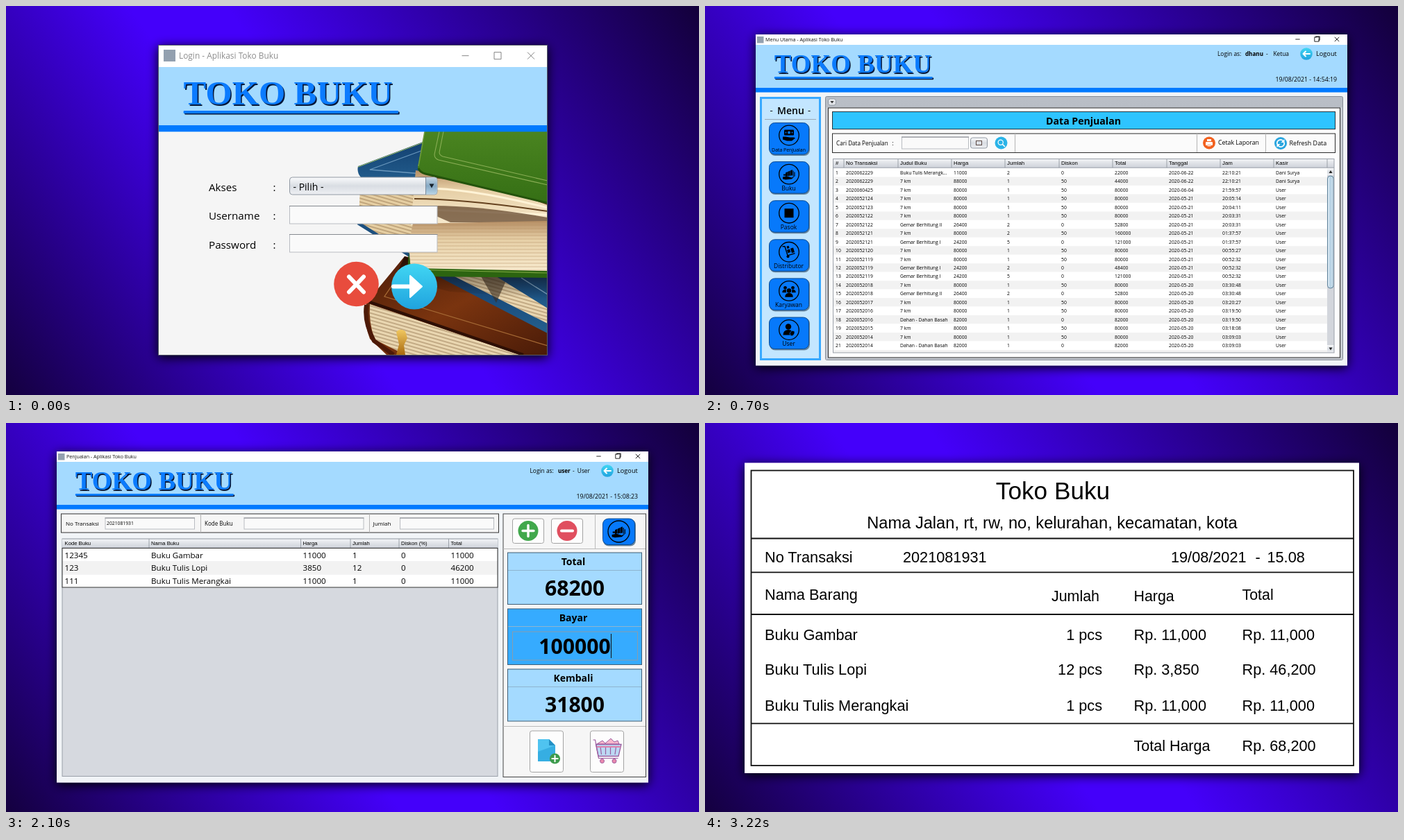
Recreate the animation shown at these times as an HTML page. Size 998 by 561 pixels, loop 3500 ms.

```html
<!DOCTYPE html>
<html lang="id">
<head>
<meta charset="utf-8">
<title>Toko Buku</title>
<style>
html, body { margin: 0; width: 100%; height: 100%; overflow: hidden; background: #14003f; }
svg { display: block; width: 998px; height: 561px; }
text { white-space: pre; }
.ui { font-family: "Open Sans", "Noto Sans", sans-serif; }
.sans { font-family: "Liberation Sans", Arial, sans-serif; }
.serif { font-family: "Liberation Serif", Times, serif; }
</style>
</head>
<body>
<svg id="stage" viewBox="0 0 998 561" xmlns="http://www.w3.org/2000/svg"></svg>
<script>
const HOLD = 700;
const SKY = '#a4daff', BLUE = '#007aff', CYAN = '#2ec4ff', GREY = '#d6d9df';

// --- drawing helpers ---
const rect = (x, y, w, h, fill, more = '') =>
  `<rect x="${x}" y="${y}" width="${w}" height="${h}" fill="${fill}" ${more}/>`;
const box = (x, y, w, h, fill, stroke, more = '') =>
  rect(x + .5, y + .5, w - 1, h - 1, fill, `stroke="${stroke}" ${more}`);
const disc = (x, y, r, fill, more = '') =>
  `<circle cx="${x}" cy="${y}" r="${r}" fill="${fill}" ${more}/>`;
const line = (d, stroke, w = 1, more = '') =>
  `<path d="${d}" fill="none" stroke="${stroke}" stroke-width="${w}" ${more}/>`;
const area = (d, fill, more = '') => `<path d="${d}" fill="${fill}" ${more}/>`;
const text = (x, y, s, size, { font = 'ui', fill = '#000', anchor = 'start', weight = 400 } = {}) =>
  `<text class="${font}" x="${x}" y="${y}" font-size="${size}" fill="${fill}" text-anchor="${anchor}" font-weight="${weight}">${s}</text>`;
const group = (x, y, k, body) => `<g transform="translate(${x} ${y}) scale(${k})">${body}</g>`;
const ROUND = 'stroke-linecap="round" stroke-linejoin="round"';
const MID = { anchor: 'middle' }, BOLD = { weight: 700 }, HEAD = { anchor: 'middle', weight: 700 };

const grad = (id, stops, dir = 'x1="0" y1="0" x2="0" y2="1"') =>
  `<linearGradient id="${id}" ${dir}>` +
  stops.map(([o, c]) => `<stop offset="${o}" stop-color="${c}"/>`).join('') + '</linearGradient>';

const defs = '<defs>' +
  grad('sky', [[0, '#14003f'], [.41, '#4400fa'], [.51, '#4400fa'], [1, '#13003a']],
    'gradientUnits="userSpaceOnUse" x1="33" y1="607" x2="965" y2="-46"') +
  grad('head', [[0, '#f4f5f8'], [.5, '#dfe2e7'], [1, '#cdd1d9']]) +
  grad('frame', [[0, '#b9bec6'], [1, '#a2a8b1']]) +
  grad('key', [[0, '#fafbfc'], [.5, '#d9dde3'], [1, '#eef0f3']]) +
  grad('arrow', [[0, '#c2d4e2'], [.5, '#86a9c4'], [1, '#b8d4e6']]) +
  grad('thumb', [[0, '#e9f3fa'], [.5, '#b3cfe2'], [1, '#d7e8f3']], 'x1="0" y1="0" x2="1" y2="0"') +
  grad('aqua', [[0, '#41d6f3'], [1, '#20a3de']]) +
  grad('green', [[0, '#4a8420'], [1, '#356f15']]) +
  grad('navy', [[0, '#123f70'], [1, '#24608f']]) +
  grad('brown', [[0, '#4c1c08'], [.5, '#7a340f'], [1, '#4a1b08']], 'x1="0" y1="0" x2="1" y2="1"') +
  grad('cream', [[0, '#b68e64'], [.35, '#e6cfa6'], [1, '#f8ebcf']]) +
  grad('gold', [[0, '#f1c860'], [1, '#a8690f']]) +
  grad('shade', [[0, 'rgba(20,8,0,.75)'], [1, 'rgba(20,8,0,0)']]) +
  '<pattern id="leaf" width="8" height="5" patternUnits="userSpaceOnUse"><path d="M0 1H8" stroke="#b08a5c" stroke-opacity=".45"/></pattern>' +
  '<pattern id="tilt" width="8" height="5" patternUnits="userSpaceOnUse" patternTransform="rotate(16)"><path d="M0 1H8" stroke="#84613c" stroke-width="1.3" stroke-opacity=".6"/></pattern>' +
  '<filter id="drop" x="-20%" y="-20%" width="140%" height="140%"><feDropShadow dx="0" dy="3" stdDeviation="8" flood-color="#000" flood-opacity="1"/></filter>' +
  '<clipPath id="view"><rect x="219" y="181" width="561" height="322"/></clipPath>' +
  '<clipPath id="rows"><rect x="184" y="220" width="722" height="280"/></clipPath></defs>';

// --- shared parts ---
function controls(xs, y, s, color, restore) {
  const [a, b, c] = xs;
  const back = restore ? line(`M${b - s + 2} ${y - s + 1}v-2H${b + s + 1}V${y + s - 2}h-2`, color, .9) : '';
  return line(`M${a - s} ${y}h${2 * s}`, color, .9) + back +
    line(`M${b - s} ${y - s}h${2 * s}v${2 * s}h${-2 * s}z`, color, .9) +
    line(`M${c - s} ${y - s}l${2 * s} ${2 * s}m0 ${-2 * s}l${-2 * s} ${2 * s}`, color, .9);
}

function logo(x, y, size, w, bar, barH) {
  const off = .5 + size / 45;
  const word = (d, fill) => text(x + d, y + d, 'TOKO BUKU', size, { font: 'serif', fill, weight: 700 }) +
    rect(x + d, bar + d, w, barH, fill, 'rx="1"');
  return word(off, '#06183a') + word(0, '#0b7bff');
}

const field = (x, y, w, h) => box(x, y, w, h, '#fafafa', '#b9bcc1') + line(`M${x} ${y + .5}h${w}`, '#85898f');
const nimKey = (x, y, w, h, r = 3) => box(x, y, w, h, 'url(#key)', '#9199a3', `rx="${r}"`);
const plainKey = (x, y, w, h) => box(x, y, w, h, '#fdfdfd', '#a3a3a3', 'rx="3"');

const leftArrow = (x, y) => disc(x, y, 8.8, 'url(#aqua)') +
  line(`M${x + 5} ${y}H${x - 4.5}m3.5 -3.5l-3.5 3.5l3.5 3.5`, '#fff', 2, ROUND);
const search = (x, y) => disc(x, y, 9, '#2ab4e8') + disc(x - .8, y - .8, 3.6, 'none', 'stroke="#fff" stroke-width="1.2"') +
  line(`M${x + 2} ${y + 2}l3 3`, '#fff', 1.6, ROUND);
const refresh = (x, y) => disc(x, y, 9, '#2ba6df') +
  line(`M${x - 5} ${y + 1}a5 5 0 0 1 8.5 -4.5M${x + 5} ${y - 1}a5 5 0 0 1 -8.5 4.5`, '#fff', 1.8) +
  area(`M${x + 5.5} ${y - 6}v5h-5zM${x - 5.5} ${y + 6}v-5h5z`, '#fff');

function grid({ x, y, w, heads, rows, pitch, size, top = y + 13.5, headSize = 7.8 }) {
  const cols = heads.map(h => h[0]);
  let out = rect(x, y, w, 13.5, 'url(#head)') + line(`M${x} ${y + 13.2}h${w}`, '#8f959e', .8) +
    line(`M${x} ${y + .4}h${w}`, '#aab0b8', .8);
  heads.forEach(([cx, label], i) => {
    if (i) out += line(`M${cx - 3} ${y}v13`, '#8c929b', .8);
    out += text(cx, y + 9.4, label, headSize, { font: 'sans' });
  });
  rows.forEach((row, r) => {
    const ry = top + r * pitch;
    out += rect(x, ry, w, pitch, r % 2 ? '#f2f2f2' : '#fff');
    row.forEach((cell, i) => out += text(cols[i], ry + pitch / 2 + size * .37, cell, size));
  });
  return out;
}

// --- small pictograms, drawn around 0,0 ---
const books = rect(-8, 0, 6, 2, '#000') + area('M-9 4l6-1 7 2 5-3-5 5-9 1-4-1z', '#000') +
  [-5, -1.6, 1.8].map((x, i) => area(`M${x} ${-2 + i * -1.5}l3-1.5v${6 + i}l-3 1z`, '#000')).join('') +
  line('M6 -5v8M8 -3v6', '#000', 1.1);
const person = (x, y, k) => group(x, y, k, disc(0, -3, 2.8, '#000') + area('M-5 5q0-5 5-5t5 5z', '#000'));
const icons = [
  rect(-7, -8, 14, 8, '#000', 'rx="1"') + disc(0, -4, 2, BLUE) + disc(-4.5, -4, .9, BLUE) + disc(4.5, -4, .9, BLUE) +
    area('M-9 2h4l6 1h6l2 1-5 4h-7l-6-2z', '#000'),
  books,
  rect(-6.5, -6.5, 13, 13, '#000'),
  line('M-9 -8h3l4 13l10 -3', '#000', 1.4, ROUND) + disc(-1.5, 6.5, 2, '#000') +
    area('M-3 -3l4-1.2 1.3 4.4-4 1.2zM2 -5l4-1.2 2 6.5-4 1.2zM-3.5 -8l3-1 1 3.2-3 1z', '#000'),
  person(-5.5, -2, .85) + person(5.5, -2, .85) + disc(0, 0, 4.3, BLUE) + person(0, 3, 1.15),
  person(-1, 0, 1.5) + area('M4 1l4 1v3q-1 3-4 4q-3-1-3-4z', '#000', 'stroke="#007aff" stroke-width=".8"'),
];
const menu = ['Data Penjualan', 'Buku', 'Pasok', 'Distributor', 'Karyawan', 'User'];
const blueKey = (x, y, w, h) => rect(x + 1, y + 1.5, w, h, '#66859f', 'rx="8"') +
  box(x, y, w, h, '#0779fb', '#0b4c92', 'rx="8"');
const ring = (x, y, r, icon, k = 1) => disc(x, y, r, 'none', 'stroke="#000" stroke-width="1.3"') + group(x, y, k, icon);

function mainWindow(title, user, role, time, tone = '#111') {
  const start = role === 'User' ? [754.5, 795, 816] : [738, 778, 808];
  return rect(73, 41, 852, 477.5, '#f1f4f7', 'filter="url(#drop)"') + rect(73, 41, 852, 15, '#fff') +
    rect(75, 44, 9.5, 9.5, '#93a0af') + text(87, 51.3, title, 7.15, { fill: tone }) +
    controls([853.5, 881, 910], 48, 3.2, tone, true) +
    rect(73, 56, 852, 62, SKY) + rect(73, 118, 852, 6.5, BLUE) +
    logo(99.8, 96.3, 37, 228, 102, 3) +
    text(start[0], 72, 'Login as:', 8.4) + text(start[1], 72, user, 8.1, BOLD) + text(start[2], 72, '-', 8.4) +
    text(841, 72, role, 8.4, { anchor: 'end' }) + leftArrow(866, 69) + text(880, 72, 'Logout', 9.2) +
    text(910, 109.3, `19/08/2021 - ${time}`, 8.75, { anchor: 'end' });
}

// --- scene: login ---
function bookPile() {
  const sheets = (d, lines, fill = '#ead7b1') => area(d, fill) + area(d, `url(#${lines})`);
  return '<g clip-path="url(#view)">' +
    // brown volume
    area('M574 361L519 428q-6 22 5 52l24 23H780V398z', 'url(#brown)') +
    sheets('M524 430L740 503H575L531 481q-9-25-7-51z', 'tilt') +
    line('M519 431q-4 24 11 52l28 20', '#4d1a08', 6) + line('M521 426L745 503', '#2e0f04', 4) +
    line('M575 375L545 419L780 490M640 396L780 456', '#a66a35', 1.3) +
    area('M562 470q5-6 13-1l3 10-5 10 2 14h-13l4-15z', 'url(#gold)') +
    // blue volume, lower part
    area('M622 390H780V472z', 'url(#navy)') +
    sheets('M646 390H780V458z', 'tilt') +
    area('M684 390L722 392 706 428z', '#3a2c1e', 'opacity=".6"') +
    area('M706 390H780V436z', 'url(#navy)') + line('M742 392L780 416', '#7fa6c5', 1.3) +
    area('M574 361L640 390H780V422L640 412 560 392z', 'url(#shade)') +
    // blue volume, upper part
    sheets('M510 258H592V364L508 313z', 'tilt', '#e6cfa3') +
    line('M507 313L585 362', '#1d507f', 5) +
    area('M507 231L603 195V258L511 247q-6-7-4-16z', 'url(#navy)') +
    line('M603 207L524 236L600 242', '#6a98bd', 1.3) + line('M507 232l96-36', '#9fbf60', 1) +
    // green volume
    area('M590 237L780 272V318L583 316z', 'url(#cream)') +
    [0, 1, 2, 3].map(i => line(`M588 ${248 + i * 15}q70 ${-6 + i * 3} 192 ${38 - i * 10}`, i % 2 ? '#fff3d6' : '#65421f', i % 2 ? 3 : 2)).join('') +
    area('M588 289q70-5 192 16v7H640z', '#4f3017', 'opacity=".65"') +
    sheets('M586 314L780 310V384L583 379q-5-32 3-65z', 'leaf', 'url(#cream)') +
    area('M580 355L583 378 780 382V392L600 390q-17-1-22-8z', '#2c6410') + line('M584 380L780 385', '#78a33e', 1.2) +
    area('M603 181L593 232q0 8 10 10L780 284V181z', 'url(#green)') +
    line('M594 234q2 6 10 8L780 284', '#24530c', 3) + line('M603 181L594 231', '#6f9c3c', 1.5) +
    line('M624 181L617 214q0 6 6 8L780 258M630 181L624 211q0 4 5 6L780 252', '#8aae55', 1.1) + '</g>';
}

function login() {
  const row = (y, s) => text(292, y, s, 15.2) + text(384.5, y, ':', 15.2);
  return rect(219, 56, 561, 448, '#f5f5f5', 'filter="url(#drop)"') + bookPile() +
    rect(219, 56, 561, 32, '#fff') + rect(227, 63, 17, 17, '#93a0af') +
    text(249, 76, 'Login - Aplikasi Toko Buku', 11.9, { fill: '#8d8d8d' }) +
    controls([661.5, 708, 756], 71.7, 5, '#777') +
    rect(219, 88, 561, 84, SKY) + rect(219, 172, 561, 9.3, BLUE) + logo(255.6, 142.2, 49.2, 309.5, 151, 4) +
    box(219, 56, 561, 448, 'none', '#555b66') +
    row(266.5, 'Akses') + row(308, 'Username') + row(349.5, 'Password') +
    nimKey(408, 246.5, 213.5, 26, 4) + area('M604.5 247.5h13q3 0 3 3v18q0 3-3 3h-13z', 'url(#arrow)') +
    line('M604.5 247v25', '#7b8b9b') + area('M609.5 256.5h7l-3.5 6z', '#15202b') + text(413.5, 265.5, '- Pilih -', 14) +
    field(408, 288, 213.5, 26.5) + field(408, 329, 213.5, 26.5) +
    disc(504.5, 401, 32.3, '#e84c3d') + line('M494 390.5l21 22m0 -22l-21 22', '#fff', 6, ROUND) +
    disc(588, 404.5, 33, 'url(#aqua)') + line('M558 404.5h26', '#fff', 6, ROUND) +
    area('M582 389L599 404.5 582 420z', '#fff', 'stroke="#fff" stroke-width="2" stroke-linejoin="round"');
}

// --- scene: sales list ---
const titles = ['Buku Tulis Merangk...', '7 km', 'Gemar Berhitung I', 'Gemar Berhitung II', 'Dahan - Dahan Basah'];
const prices = [11000, 80000, 24200, 26400, 82000];
// id, title, amount, hour; the day is part of the id
const sales = `2020062229 0 2 22:10:21,2020062229 1 1 22:10:21,2020060425 1 1 21:59:57,2020052124 1 1 20:05:14,
2020052123 1 1 20:04:11,2020052122 1 1 20:03:31,2020052122 3 2 20:03:31,2020052121 1 2 01:37:57,2020052121 2 5 01:37:57,
2020052120 1 1 00:55:27,2020052119 1 1 00:52:32,2020052119 2 2 00:52:32,2020052119 2 5 00:52:32,2020052018 1 1 03:30:48,
2020052018 3 2 03:30:48,2020052017 1 1 03:20:27,2020052016 1 1 03:19:50,2020052016 4 1 03:19:50,2020052015 1 1 03:18:08,
2020052014 1 1 03:09:03,2020052014 4 1 03:09:03,2020052013 1 1 03:08:16`.split(/,\s*/).map((s, i) => {
  const [id, t, n, hour] = s.split(' ');
  const price = i === 1 ? 88000 : prices[t];
  const day = `${id.slice(0, 4)}-${id.slice(4, 6)}-${id.slice(6, 8)}`;
  return [i + 1, id, titles[t], price, n, t === '1' ? 50 : 0, i === 1 ? 44000 : price * n, day, hour, i < 2 ? 'Dani Surya' : 'User'];
});

function salesList(time, tone) {
  let out = mainWindow('Menu Utama - Aplikasi Toko Buku', 'dhanu', 'Ketua', time, tone) +
    rect(80.5, 132.5, 85, 377, '#c3e6ff', 'stroke="#38a9ff" stroke-width="3"') +
    text(123.5, 155.5, 'Menu', 14, { anchor: 'middle', weight: 600 }) +
    text(93.5, 155, '-', 13) + text(148, 155, '-', 13) + line('M86 163.5h74', '#9aaab8');
  menu.forEach((label, i) => {
    const y = 168 + i * 56.1;
    out += blueKey(92, y, 58, 46.5) + ring(121, y + 18.5, 14.3, icons[i]) +
      text(120.5, y + (i ? 41.8 : 41.5), label, i ? 8.5 : 6.9, MID);
  });
  out += box(173, 130, 746, 381, 'url(#frame)', '#848b95', 'rx="2"') + rect(174, 146, 744, 364, '#c5c9d0') +
    nimKey(177, 133.5, 12, 10) + area('M180.5 137h5l-2.5 3.5z', '#333') +
    box(177, 146.5, 738, 361, '#fdfdfd', '#2a2a2a') +
    box(183, 152, 725, 26, CYAN, '#23343d') + text(545, 171, 'Data Penjualan', 14.1, HEAD) +
    box(183, 183.5, 725, 28.5, '#fbfbfb', '#2b2b2b') +
    text(189, 201, 'Cari Data Penjualan', 8.15) + text(269.5, 201, ':', 8.15) +
    field(283, 188.5, 97, 18) + nimKey(382, 189.5, 25, 16) + rect(390.5, 194.5, 8, 6, 'none', 'stroke="#5d4a45"') +
    search(426.5, 197.5) + line('M446.5 184v27M708.5 184v27M807.5 184v27', '#b4b4b4') +
    disc(726, 197.5, 9, '#f2611f') + rect(721, 196, 10, 5, '#fff', 'rx="1"') + rect(723, 192, 6, 3, '#fff') +
    rect(723.5, 199, 5, 3.5, '#ffd3bd') +
    text(739, 200.4, 'Cetak Laporan', 8.75) + refresh(829, 198) + text(841.5, 201, 'Refresh Data', 8.95) +
    rect(184, 220, 722, 280, '#fff') + '<g clip-path="url(#rows)">' +
    grid({
      x: 184, y: 220, w: 722, rows: sales, pitch: 12.475, size: 6.8, top: 234,
      heads: [[188, '#'], [203, 'No Transaksi'], [281, 'Judul Buku'], [358, 'Harga'], [435, 'Jumlah'], [513, 'Diskon'],
        [590, 'Total'], [668, 'Tanggal'], [745, 'Jam'], [822, 'Kasir'], [899, '']]
    }) + '</g>' +
    rect(896, 234, 10, 266, '#d3d6dc') + rect(896, 234, 10, 10, 'url(#key)') + rect(896, 489, 10, 11, 'url(#key)') +
    area('M898.5 241h5l-2.5-4zM898.5 492.5h5l-2.5 4z', '#222') +
    box(896, 244.5, 9.5, 163, 'url(#thumb)', '#5b7f98', 'rx="4"') +
    box(184, 220, 722.5, 280.5, 'none', '#9aa0a9');
  return out;
}

// --- scene: book list dialog ---
const stock = `A01|7 km|979-759-151-4|Galih Wirasant...|Lorapena|2005|93|Lainnya|77000|88000|50
9786010208789|Gemar Berhitung I|982-612-1102-03|Tim Pelanta|Pelanta Press|2010|138|Pendidikan|20000|24200|0
9786021108789|Gemar Berhitung II|978-602-1108-7...|Tim Pelanta|Pelanta Press|2010|78|Pendidikan|23000|26400|0
12345|Buku Gambar|-|-|-|-|100|Lainnya|90000|11000|0
111|Buku Tulis Merangkai|089-019-111-2222|Jarwan|Wacana Ulin|2010|122|Pendidikan|9000|11000|0
123|Buku Tulis Lopi|978-912-012-1111|Bimo Sartono|Pijar Rimba|2010|150|Pendidikan|3000|3850|0
L-A5-50|Loose Leaf A5 50lbr|-|-|Top Kuda|2020|20|Lainnya|4500|5500|0
B-01|Dahan - Dahan Basah|00129311|Farhan Ludiro|Warta|2005|94|Fiksi|80000|82000|0`
  .split('\n').map((s, i) => [i + 1, ...s.split('|')]);

function bookList() {
  return salesList('14:54:42', '#979797') +
    rect(131, 79, 737, 399, '#f6f6f6', 'filter="url(#drop)"') + rect(131, 79, 737, 19, '#fff') +
    box(131, 79, 737, 399.5, 'none', '#39424d') +
    rect(136.5, 83.5, 9.5, 9.5, '#93a0af') + text(149, 91.2, 'Data Buku - Aplikasi Toko Buku', 7.15) +
    controls([796.5, 824.5, 853.5], 88.3, 3.3, '#222') +
    box(137, 104, 725, 26, CYAN, '#23343d') + text(499.5, 123, 'Data Buku', 14, HEAD) +
    box(137, 135.5, 724, 28, '#fbfbfb', '#2b2b2b') +
    text(143.5, 152.7, 'Cari Buku', 8.2) + text(193, 152.7, ':', 8.2) +
    rect(207, 140.8, 154.5, 17.4, '#fff', 'stroke="#5ea3cf" stroke-width="1.8"') +
    box(207.5, 141.3, 153.5, 16.4, 'none', '#a58c86') + line('M210.5 145v9', '#000') +
    search(378, 149.3) + line('M400.5 136v27M681.5 136v27M762.5 136v27', '#b4b4b4') +
    group(698, 149.5, 1, '<g transform="rotate(-42)">' + rect(-6, -2.6, 11, 5.2, '#ef9443') +
      rect(-6, -.6, 11, 1.4, '#c96a24') + rect(5, -2.6, 3.5, 5.2, '#d65a5a') + area('M-6-2.6L-10.5 0-6 2.6z', '#6b4a3c') + '</g>') +
    text(711, 152.7, 'Entri Data', 8.95) + refresh(783, 149.8) + text(795.5, 152.7, 'Refresh Data', 8.95) +
    box(138, 170.5, 722, 301, GREY, '#9aa0a9') +
    grid({
      x: 138.5, y: 171, w: 721, rows: stock, pitch: 12.5, size: 6.8, top: 185.5,
      heads: [[142, '#'], [158, 'Kode Buku'], [223.5, 'Judul Buku'], [336, 'No ISBN'], [401, 'Penulis'], [467, 'Penerbit'],
        [532.5, 'Tahun'], [598, 'Stok'], [629, 'Kategori Buku'], [694.5, 'Harga Pokok'], [760, 'Harga Jual'], [825, 'Diskon']]
    });
}

// --- scene: till ---
function sum(y, h, label, value, fill, base) {
  return box(722, y, 194, h, fill, '#3f5e75') + line(`M723 ${y + 26}h192`, '#8eb5cf') +
    text(817, y + 18.7, label, 14, HEAD) + text(819, base, value, 30.2, HEAD);
}

function till() {
  const plus = (x, y, r, fill, w, both) => disc(x, y, r, fill) +
    line(`M${x - r * .55} ${y}h${r * 1.1}` + (both ? `M${x} ${y - r * .55}v${r * 1.1}` : ''), '#fff', w, ROUND);
  const paper = area('M766 456h16l9 9v23h-25z', '#4fc3f0') + area('M782 456l9 9h-9z', '#238fc4') +
    area('M766 474l25-9v23h-25z', '#36aee2') + plus(790.5, 484, 7.6, '#3d9b4c', 2, true);
  const purple = '#9c5d9f';
  const cart = area('M851 463l8-5 4 4 8-7 5 5 5-2 2 5z', '#f7b6cc', `stroke="${purple}"`) +
    area('M849.5 463.5H886l-4 17H853z', '#bcd9f3', `stroke="${purple}" stroke-width="1.3"`) +
    line('M845.5 457h3l5 26.5h28M856 467l1.5 11m6-11v11m7-11v11m8-11l-1.5 11', purple, 1.2) +
    line('M851 467h34', '#e07fa9', 2) + disc(858.5, 487.5, 3, '#e989ad', `stroke="${purple}"`) + disc(876, 487.5, 3, '#e989ad', `stroke="${purple}"`);
  return mainWindow('Penjualan - Aplikasi Toko Buku', 'user', 'User', '15:08:23') +
    box(79, 130.5, 631, 28, '#f6f6f6', '#333') + line('M280.5 131v27M523.5 131v27', '#b4b4b4') +
    text(86, 148, 'No Transaksi', 8) + text(286, 148, 'Kode Buku', 8.05) + text(528.5, 148, 'Jumlah', 8) +
    field(142.5, 136.5, 129.5, 17) + field(342.5, 136.5, 173, 17) + field(567, 136.5, 136, 17) +
    text(145, 147.3, '2021081931', 6.8) +
    box(80.5, 166.5, 628, 343.5, GREY, '#9aa0a9') +
    grid({
      x: 81, y: 167, w: 627, pitch: 18.7, size: 11.6, top: 181, headSize: 7.7,
      heads: [[84.5, 'Kode Buku'], [209, 'Nama Buku'], [427.5, 'Harga'], [499, 'Jumlah'], [569, 'Diskon (%)'], [640.5, 'Total']],
      rows: [['12345', 'Buku Gambar', 11000, 1, 0, 11000], ['123', 'Buku Tulis Lopi', 3850, 12, 0, 46200],
        ['111', 'Buku Tulis Merangkai', 11000, 1, 0, 11000]]
    }) + box(80.5, 180, 628, 57.5, 'none', '#333') +
    box(715.5, 130.5, 206.5, 380.5, '#f6f6f6', '#444') +
    line('M848.5 131v50M716 181.5h205M716 437.5h205', '#bbb') +
    plainKey(729, 137.5, 46, 36.5) + plainKey(785, 137.5, 46, 36.5) +
    plus(752, 155.5, 14.5, '#41a84c', 3.4, true) + plus(808, 155.5, 14.5, '#e04f5f', 4, false) +
    blueKey(859, 137.5, 47, 38.5) + ring(882.5, 156.5, 15.5, books, 1.1) +
    sum(186.5, 75.5, 'Total', '68200', SKY, 249.3) + sum(267.5, 81.5, 'Bayar', '', '#36abff', 0) +
    box(729, 300.5, 181, 42, 'none', '#8a9cab') + text(819, 333.3, '100000', 30.2, HEAD) + line('M871.5 304v35', '#111') +
    sum(354.5, 76, 'Kembali', '31800', SKY, 417.3) +
    plainKey(754, 443.5, 49, 60.5) + plainKey(841, 443.5, 49, 60.5) + paper + cart;
}

// --- scene: receipt ---
function receipt() {
  const say = (x, y, s, size = 21.7, anchor = 'start') => text(x, y, s, size, { font: 'sans', anchor });
  const item = (y, name, n, price, total) => say(86, y, name) + say(572, y, `${n} pcs`, 21.7, 'end') +
    say(617.5, y, `Rp. ${price}`) + say(773.5, y, `Rp. ${total}`);
  return rect(57, 57.5, 885, 447.5, '#fff', 'filter="url(#drop)"') +
    rect(66.5, 68.5, 867.5, 425.5, 'none', 'stroke="#111" stroke-width="1.8"') +
    line('M66 166.5h868M66 215.3h868M66 276h868M66 433.3h868', '#111', 1.8) +
    say(501, 109.5, 'Toko Buku', 35.2, 'middle') +
    say(500, 152, 'Nama Jalan, rt, rw, no, kelurahan, kecamatan, kota', 23.65, 'middle') +
    say(86, 201.3, 'No Transaksi') + say(285, 201.3, '2021081931') +
    say(671, 201.3, '19/08/2021') + say(792.5, 201.3, '-') + say(809.5, 201.3, '15.08') +
    say(86, 255, 'Nama Barang') + say(499, 256.5, 'Jumlah', 21.4) + say(617.5, 256.5, 'Harga', 21.4) + say(773.5, 255, 'Total', 21.4) +
    item(312.5, 'Buku Gambar', 1, '11,000', '11,000') + item(363.3, 'Buku Tulis Lopi', 12, '3,850', '46,200') +
    item(415, 'Buku Tulis Merangkai', 1, '11,000', '11,000') +
    say(617.5, 472.5, 'Total Harga', 21.5) + say(773.5, 472.5, 'Rp. 68,200');
}

const scenes = [login(), salesList('14:54:19'), bookList(), till(), receipt()];
const stage = document.getElementById('stage');
stage.innerHTML = defs + rect(0, 0, 998, 561, 'url(#sky)') +
  scenes.map(s => `<g class="scene" display="none">${s}</g>`).join('');
const layers = [...stage.querySelectorAll('.scene')];

const begin = performance.now();
let shown = -1;
function draw(now) {
  const at = Math.floor(Math.max(0, now - begin) / HOLD) % layers.length;
  if (at !== shown) layers.forEach((g, i) => g.setAttribute('display', i === at ? 'inline' : 'none'));
  shown = at;
  requestAnimationFrame(draw);
}
draw(begin);
</script>
</body>
</html>
```
